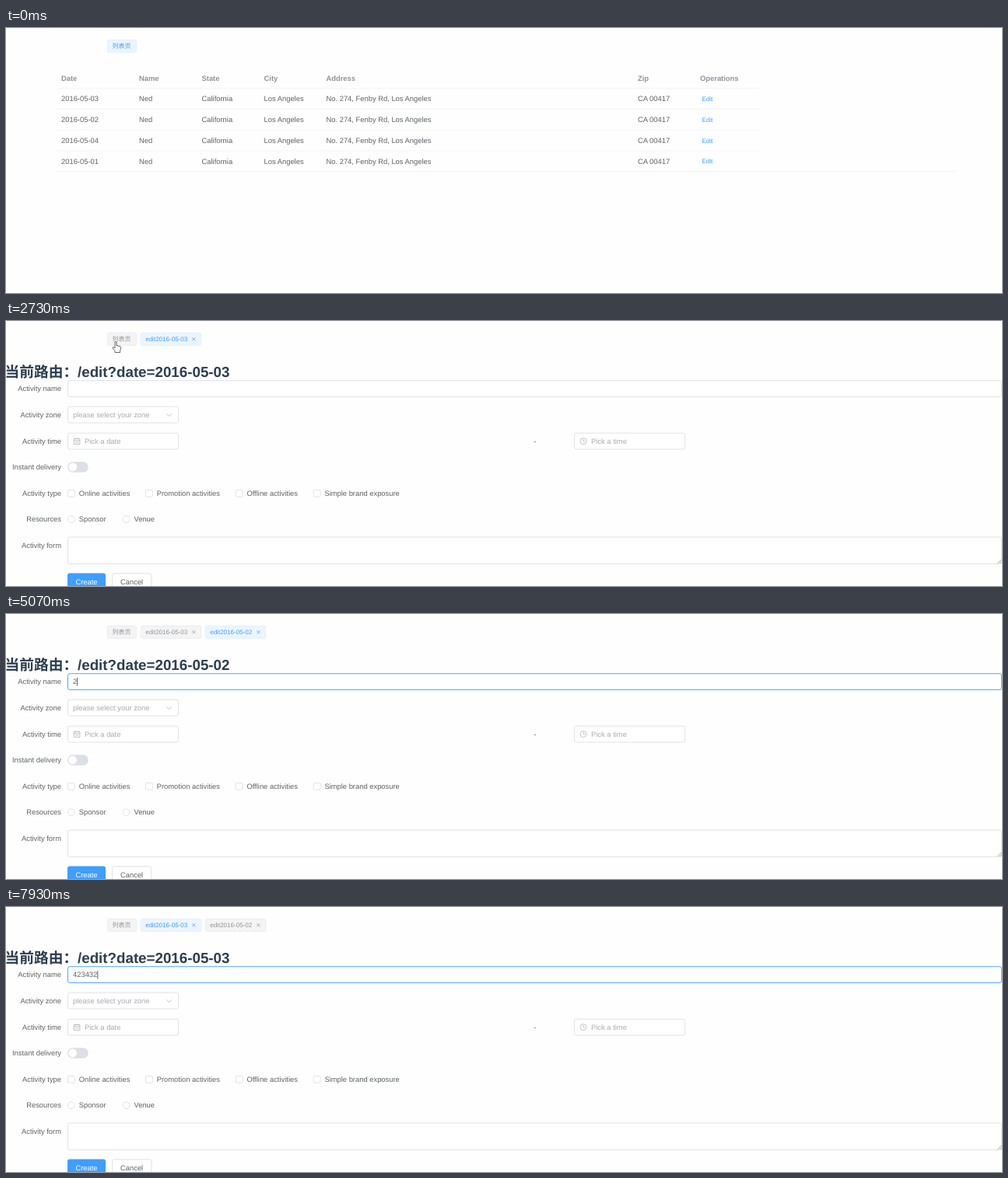
An HTML page that plays this animation: 1280 by 341 pixels, repeating every 8000 ms.

```html
<!DOCTYPE html>
<html lang="en">
<head>
<meta charset="utf-8">
<title>Tabbed list and form</title>
<style>
  html, body { margin: 0; width: 100%; height: 100%; overflow: hidden; background: #fefefe; }
  svg { display: block; width: 100%; height: 100%; }
  text { font-family: "Liberation Sans", "Noto Sans CJK SC", "Noto Sans CJK", Arial, sans-serif; font-size: 9.38px; fill: #606266; text-rendering: geometricPrecision; white-space: pre; }
  .head { font-weight: bold; fill: #909399; }
  .link { font-size: 8.04px; fill: #409eff; }
  .link.pale { fill: #a0cfff; }
  .hint { fill: #a8abb2; }
  .title { font-size: 18.76px; font-weight: bold; fill: #2c3e50; }
  .box { fill: #fff; stroke: #dcdfe6; stroke-width: .9; }
  .box.focus { stroke: #409eff; }
  .icon { fill: none; stroke: #a8abb2; stroke-width: .7; }
  .tag rect { fill: #f4f4f5; stroke: #e9e9eb; stroke-width: .7; }
  .tag text { font-size: 8.04px; fill: #909399; }
  .tag path { stroke: #909399; stroke-width: .8; }
  .tag.on rect { fill: #ecf5ff; stroke: #d9ecff; }
  .tag.on text { fill: #409eff; }
  .tag.on path { stroke: #409eff; }
  .pointer path { fill: #fff; stroke: #444; stroke-width: .8; stroke-linejoin: round; }
</style>
</head>
<body>
<svg id="stage" viewBox="0 0 1280 341" preserveAspectRatio="none"></svg>
<script>
const LOOP = 8000, STEP = 130;
const stage = document.getElementById('stage');
const $ = id => document.getElementById(id);

// ---- markup helpers ----
const text = (x, mid, str, cls = '', extra = '') =>
  `<text x="${x}" y="${mid + 3.3}" class="${cls}" ${extra}>${str}</text>`;
const box = (x, y, w, h, r = 2.5, extra = '') =>
  `<rect class="box" x="${x}" y="${y}" width="${w}" height="${h}" rx="${r}" ${extra}/>`;
const icon = d => `<path class="icon" d="${d}"/>`;
const END = 'text-anchor="end"', MID = 'text-anchor="middle"';

// ---- list page ----
const COLS = [71, 171, 251.5, 331.5, 411.5, 812, 892];
const HEADS = ['Date', 'Name', 'State', 'City', 'Address', 'Zip', 'Operations'];
const DAYS = ['03', '02', '04', '01'];
const ROW_TOP = 77.7, ROW_H = 26.75;

function listPage() {
  let out = HEADS.map((h, i) => text(COLS[i], 64.3, h, 'head')).join('');
  DAYS.forEach((day, i) => {
    const top = ROW_TOP + i * ROW_H, mid = top + 13.4;
    const cells = ['2016-05-' + day, 'Ned', 'California', 'Los Angeles',
      'No. 274, Fenby Rd, Los Angeles', 'CA 00417'];
    out += `<rect id="row${i}" x="64" y="${top}" width="905" height="${ROW_H}" fill="#f5f7fa"/>`;
    out += cells.map((c, k) => text(COLS[k], mid, c)).join('');
    out += text(894.5, mid - .2, 'Edit', 'link', `id="edit${i}"`);
  });
  for (let i = 0; i < 5; i++) {
    const y = ROW_TOP + i * ROW_H;
    out += `<path d="M64 ${y}H${i < 4 ? 968 : 1222}" stroke="#f0f2f6" stroke-width=".8"/>`;
  }
  return out;
}

// ---- form page ----
const LABELS = ['Activity name', 'Activity zone', 'Activity time', 'Instant delivery',
  'Activity type', 'Resources', 'Activity form'];
const CHECKS = [[79.5, 'Online activities'], [179.5, 'Promotion activities'],
  [295.2, 'Offline activities'], [395.2, 'Simple brand exposure']];
const RADIOS = [[79.5, 'Sponsor'], [150.2, 'Venue']];

function formPage() {
  let out = text(-1.5, 68.2, '当前路由：', 'title') + text(92, 68.2, '', 'title', 'id="route"');
  out += LABELS.map((l, i) => text(71, 87 + i * 33.6, l, '', END)).join('');
  out += box(79.5, 76.7, 1200, 20.8, 2.5, 'id="field"') + text(86, 87, '', '', 'id="value"');
  out += '<path id="caret" d="M0 82V92.5" stroke="#333" stroke-width=".8"/>';
  out += box(79.5, 110.2, 142, 20.8) + text(86, 120.6, 'please select your zone', 'hint');
  out += icon('M206.5 119.3l3.2 3.2 3.2-3.2');
  out += box(79.5, 144.2, 142, 20.8) + text(101, 154.6, 'Pick a date', 'hint');
  out += icon('M87.3 151.5h7.6v7h-7.6zM87.3 153.8h7.6M89.3 150.3v2M92.9 150.3v2M88.8 156h4.6');
  out += text(679.8, 154.6, '-', '', MID);
  out += box(730.5, 144.2, 142, 20.8) + text(752, 154.6, 'Pick a time', 'hint');
  out += '<circle class="icon" cx="742" cy="154.6" r="4"/>' + icon('M742 152v2.8h2.2');
  out += '<rect x="79" y="181.3" width="26.8" height="13.4" rx="6.7" fill="#dcdfe6"/>';
  out += '<circle cx="85.7" cy="188" r="5.4" fill="#fff"/>';
  for (const [x, l] of CHECKS) out += box(x, 217.4, 8.8, 8.8, 1.3) + text(x + 14.2, 221.6, l);
  for (const [x, l] of RADIOS) out += box(x, 250.8, 8.8, 8.8, 4.4) + text(x + 14.2, 255, l);
  out += box(79.5, 278, 1200, 34.5) + '<path d="M1274.5 312l5-5M1277.5 312l2-2" stroke="#777" stroke-width=".7"/>';
  out += '<rect x="79" y="324.5" width="49" height="21.4" rx="2.7" fill="#409eff"/>';
  out += text(103.5, 335.2, 'Create', '', MID + ' style="fill:#fff"');
  out += box(136.5, 324.9, 50.4, 20.6) + text(161.6, 335.2, 'Cancel', '', MID);
  return out;
}

function tag(id, x, w, label, closable) {
  const cross = closable ? `<path d="M${x + w - 11.4} 21.3l4 4m0-4l-4 4"/>` : '';
  return `<g id="${id}" class="tag"><rect x="${x}" y="15.3" width="${w}" height="16" rx="2"/>` +
    `<text x="${x + 6}" y="26.1">${label}</text>${cross}</g>`;
}

stage.innerHTML =
  '<rect width="1280" height="341" fill="#fefefe"/>' +
  `<g id="list">${listPage()}</g><g id="form">${formPage()}</g>` +
  tag('tagList', 130.4, 37.2, '列表页') +
  tag('tag03', 173.2, 77.6, 'edit2016-05-03', true) +
  tag('tag02', 256.2, 77.6, 'edit2016-05-02', true) +
  '<path id="spin" d="M-5.4 0A5.4 5.4 0 0 1 5.4 0" fill="none" stroke="#409eff" stroke-width="1.3"/>' +
  '<g id="pointer" class="pointer">' +
  '<path id="arrow" d="M0 0V10.2L2.3 8.1 4 11.8 5.6 11 4 7.5H7.2Z"/>' +
  '<path id="hand" d="M-1 1Q0-.6 1 1V5.5L5.5 6.6Q7 7 6.8 8.8L5.6 12V14.5H-1V12.5L-3.8 8.8Q-4 7-2.6 7.6L-1 9Z"/>' +
  '<path id="beam" d="M-1.8-5H1.8M0-5V5M-1.8 5H1.8"/></g>';

// ---- timeline ----
const PAGES = [[0, 'List'], [1530, '03'], [2790, 'List'], [4110, '02'], [6950, '03']];
const LOADS = [[1275, 600], [2790, 420], [4110, 420], [6970, 300]];
const TYPING = [
  { focus: 4750, blur: 6950, start: 4940, gap: 170, str: '234234' },
  { focus: 7280, blur: LOOP, start: 7410, gap: 80, str: '423432' }];
const PATH = [[390, 700, 309], [1040, 898, 92], [1270, 898, 92], [1430, 706, 113],
  [1760, 430, 150], [2100, 300, 120], [2600, 141, 26], [2790, 141, 26],
  [3600, 894.5, 121.5], [4160, 894.5, 121.5], [4680, 300, 88], [6100, 300, 88],
  [6760, 215, 20], [7020, 215, 20], [7280, 300, 88]];
const HIDDEN = [[0, 390], [4900, 6110], [7400, LOOP]];

const clamp = v => Math.max(0, Math.min(1, v));
const show = (id, on) => $(id).setAttribute('visibility', on ? 'inherit' : 'hidden');
const within = (t, [a, b]) => t >= a && t < b;

function pointerAt(t) {
  let i = PATH.findIndex(p => p[0] > t);
  if (i < 0) i = PATH.length - 1;
  const a = PATH[Math.max(0, i - 1)], b = PATH[i];
  let k = clamp((t - a[0]) / (b[0] - a[0] || 1));
  k = k * k * (3 - 2 * k);
  return [a[1] + (b[1] - a[1]) * k, a[2] + (b[2] - a[2]) * k];
}

function drawTag(id, t, born, mid, active) {
  const k = clamp((t - born) / 300);
  const s = k ** 3 / (k ** 3 + .2 * (1 - k) ** 3);
  const el = $(id);
  el.setAttribute('transform', `translate(${mid * (1 - s)} 0) scale(${s} 1)`);
  el.setAttribute('opacity', s);
  el.setAttribute('class', active ? 'tag on' : 'tag');
}

function drawList(t) {
  const [x, y] = pointerAt(t - 100);
  const shown = !HIDDEN.some(h => within(t - 100, h));
  const over = shown ? Math.floor((y - ROW_TOP) / ROW_H) : -1;
  DAYS.forEach((_, i) => {
    show('row' + i, i === over);
    $('edit' + i).setAttribute('class', i === over && Math.abs(x - 900) < 80 ? 'link pale' : 'link');
  });
}

function drawForm(t, day) {
  $('route').textContent = '/edit?date=2016-05-' + day;
  const job = TYPING.find(j => within(t, [j.focus, j.blur]));
  const typed = job ? Math.max(0, Math.min(6, Math.floor((t - job.start) / job.gap) + 1)) : 0;
  $('value').textContent = job ? job.str.slice(0, typed) : '';
  $('field').setAttribute('class', job ? 'box focus' : 'box');
  const idle = job ? t - Math.max(job.focus, job.start + (typed - 1) * job.gap) : 0;
  show('caret', job && idle % 1060 < 530);
  $('caret').setAttribute('transform', `translate(${86.5 + typed * 5.216} 0)`);
}

function drawPointer(t, onForm) {
  const [x, y] = pointerAt(t);
  const visible = !HIDDEN.some(h => within(t, h));
  const overTag = y > 14 && y < 32 && x > 130 && x < 334;
  const overEdit = !onForm && Math.abs(x - 901) < 10 && y > ROW_TOP;
  const kind = overTag || overEdit ? 'hand' : onForm && y > 77 && y < 97 && x > 80 ? 'beam' : 'arrow';
  for (const id of ['arrow', 'hand', 'beam']) show(id, visible && id === kind);
  $('pointer').setAttribute('transform', `translate(${x} ${y})`);
}

function draw(now) {
  const t = Math.floor(now % LOOP / STEP) * STEP;
  const page = PAGES.filter(p => p[0] <= t).pop()[1];
  const onForm = page !== 'List';
  show('list', !onForm);
  show('form', onForm);
  if (onForm) drawForm(t, page); else drawList(t);
  // hidden page parts must not override their group
  if (onForm) DAYS.forEach((_, i) => show('row' + i, false));
  drawTag('tagList', t, -300, 149, !onForm);
  drawTag('tag03', t, 1275, 212, page === '03');
  drawTag('tag02', t, 4110, 295, page === '02');
  const load = LOADS.find(([a, d]) => within(t, [a, a + d]));
  show('spin', load);
  if (load) $('spin').setAttribute('transform', `translate(1264.6 11.5) rotate(${(t - load[0]) * .9 - 45})`);
  drawPointer(t, onForm);
}

const begin = performance.now();
function tick() {
  draw(performance.now() - begin);
  requestAnimationFrame(tick);
}
tick();
</script>
</body>
</html>
```
